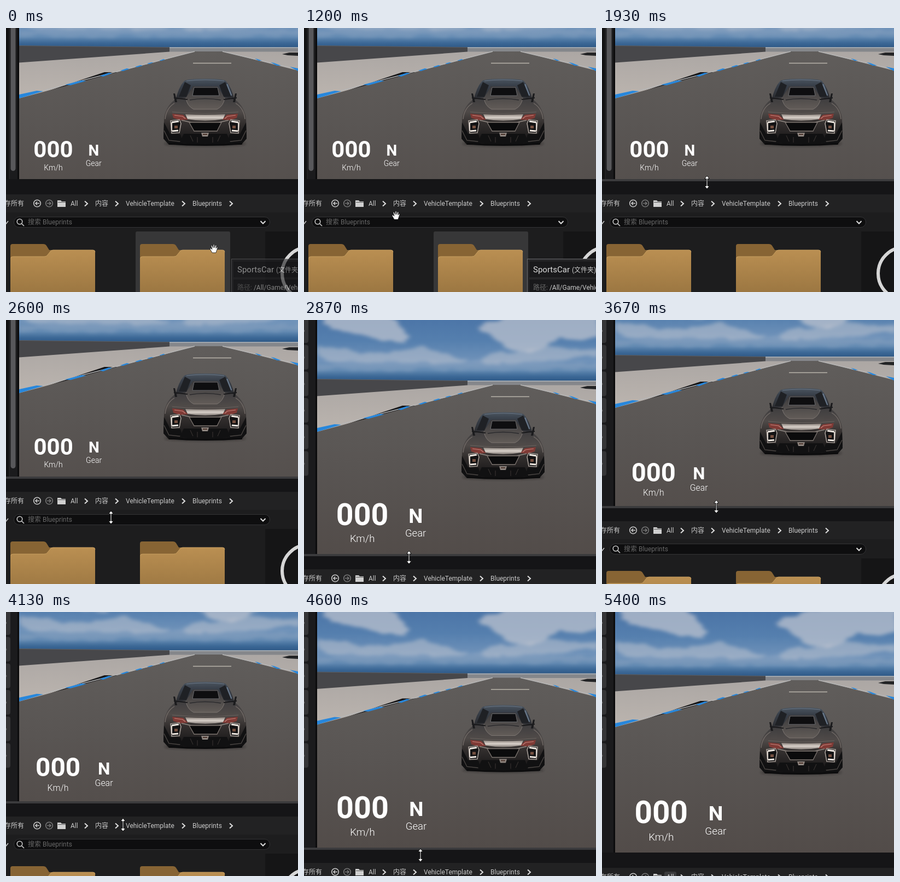
Write an HTML page that moves like this. It is 534 px wide and 484 px high and loops after 5.47 s.

```html
<!DOCTYPE html>
<html lang="zh">
<head>
<meta charset="utf-8">
<title>Editor splitter</title>
<style>
  html, body { margin: 0; width: 100%; height: 100%; overflow: hidden; background: #151517; }
  svg { display: block; width: 534px; height: 484px; }
  text { font-family: Roboto, "Noto Sans CJK SC", "Noto Sans CJK", sans-serif; font-size: 12px; fill: #c9c9c9; white-space: pre; }
  #hud text { fill: #fff; text-anchor: middle; font-weight: 300; font-size: 14px; }
  #hud .speed { font-weight: 700; font-size: 42px; }
  #hud .gear { font-weight: 700; font-size: 28px; }
  .dim { fill: #686868; }
  .line { fill: none; stroke: #c9c9c9; stroke-width: 1.6; }
  .chev { fill: none; stroke: #dedede; stroke-width: 2; }
</style>
</head>
<body>
<svg viewBox="0 0 534 484">
  <defs>
    <linearGradient id="sky" x1="0" y1="0" x2="0" y2="1">
      <stop offset="0" stop-color="#4770a4"/>
      <stop offset=".45" stop-color="#557fae"/>
      <stop offset=".72" stop-color="#6f92b9"/>
      <stop offset=".85" stop-color="#5f87b0"/>
      <stop offset=".93" stop-color="#3c6896"/>
      <stop offset="1" stop-color="#2c5684"/>
    </linearGradient>
    <linearGradient id="road" x1="0" y1="0" x2="0" y2="1">
      <stop offset="0" stop-color="#605d5b"/>
      <stop offset=".4" stop-color="#595553"/>
      <stop offset="1" stop-color="#504946"/>
    </linearGradient>
    <linearGradient id="sand" x1="0" y1="0" x2="0" y2="1">
      <stop offset="0" stop-color="#aca7a4"/>
      <stop offset="1" stop-color="#bcb5af"/>
    </linearGradient>
    <linearGradient id="body" x1="0" y1="0" x2="0" y2="1">
      <stop offset="0" stop-color="#3d3c3e"/>
      <stop offset=".3" stop-color="#4f4a48"/>
      <stop offset=".55" stop-color="#332f2e"/>
      <stop offset="1" stop-color="#141314"/>
    </linearGradient>
    <linearGradient id="roof" x1="0" y1="0" x2="0" y2="1">
      <stop offset="0" stop-color="#4b5560"/>
      <stop offset=".3" stop-color="#39404a"/>
      <stop offset="1" stop-color="#2a2a2d"/>
    </linearGradient>
    <linearGradient id="deck" x1="0" y1="0" x2="0" y2="1">
      <stop offset="0" stop-color="#3a393b"/>
      <stop offset="1" stop-color="#625c58"/>
    </linearGradient>
    <linearGradient id="chrome" x1="0" y1="0" x2="0" y2="1">
      <stop offset="0" stop-color="#8a817b"/>
      <stop offset=".5" stop-color="#d9d1ca"/>
      <stop offset="1" stop-color="#857d78"/>
    </linearGradient>
    <linearGradient id="tan" x1="0" y1="0" x2="0" y2="1">
      <stop offset="0" stop-color="#ba8f52"/>
      <stop offset="1" stop-color="#93703d"/>
    </linearGradient>
    <filter id="cloud" x="-10%" y="-20%" width="120%" height="140%">
      <feTurbulence type="fractalNoise" baseFrequency=".03 .06" numOctaves="3" seed="4"/>
      <feDisplacementMap in="SourceGraphic" scale="16" xChannelSelector="R" yChannelSelector="G"/>
      <feGaussianBlur stdDeviation="4.500 3"/>
    </filter>
    <filter id="soft" x="-20%" y="-80%" width="140%" height="260%"><feGaussianBlur stdDeviation="2"/></filter>
    <g id="folder">
      <path d="M0 120V28q0-4 4-4H60q4 0 6 3l5 8H151q4 0 4 4V120Z" transform="translate(0 -5)" fill="#876434"/>
      <path d="M0 130V46q0-4 4-4H62q4 0 6-3l4-5q2-4 6-4H151q4 0 4 4V130Z" fill="url(#tan)"/>
      <path d="M1 45q0-3 4-3H62q4 0 6-3l4-5q2-4 6-4H151q4 0 4 4" fill="none" stroke="#cda566" stroke-width=".8"/>
    </g>
    <g id="side">
      <path d="M289 252L288 282L298 293H324L319 274L300 273Z" fill="#111112"/>
      <path d="M291 246Q293 226 308 217" fill="none" stroke="#736c68" stroke-width="1.4"/>
      <path d="M304 236L324 238L333 247L318 248L306 244Z" fill="#7f3a35"/>
      <path d="M308 239L323 241L328 245" fill="none" stroke="#c4857c" stroke-width="1.2"/>
      <path d="M301 249L317 247L320 254L317 271L303 272Z" fill="#141314" stroke="#a59d97" stroke-width="1.6"/>
      <path d="M303 252L316 250M304 268L315 267" stroke="#efe8e1" stroke-width="3"/>
      <path d="M303 252V268" stroke="#d8d0c9" stroke-width="2"/>
      <rect x="308" y="258" width="6" height="5" fill="#755040"/>
      <path d="M289 267L298 285L326 288" fill="none" stroke="#4e4946" stroke-width="1.3"/>
      <path d="M321 248L338 252L345 267" fill="none" stroke="#8f8781" stroke-width="1.5"/>
      <path d="M306 199H309L313 215H309Z" fill="#1b1b1d"/>
      <path d="M327 178L316 205L330 205L338 184Z" fill="#1f2125"/>
    </g>
  </defs>

  <g id="scene">
    <rect x="24" y="-20" width="510" height="136" fill="url(#sky)"/>
    <g fill="#c2c6d0" filter="url(#cloud)">
      <g opacity=".7">
        <path d="M34 -12H150L192 30L184 42Q150 44 120 34Q70 28 34 8Z"/>
        <path d="M320 16Q350 0 400 -12H540V32Q500 44 470 34Q440 66 400 62Q360 52 345 36Z"/>
      </g>
      <g opacity=".5">
        <path d="M24 52Q70 54 105 66Q160 60 215 52L255 64Q290 70 300 78Q240 86 180 80Q90 84 24 76Z"/>
        <path d="M322 76Q350 62 400 60Q460 50 540 56V72Q440 78 322 84Z"/>
      </g>
      <path opacity=".2" d="M24 84Q280 76 540 82V94Q280 98 24 94Z"/>
    </g>
    <path d="M24 111.500L299 114.500V124L24 146Z" fill="#47474a"/>
    <path d="M24 111.500L299 114.500" stroke="#5c5e62"/>
    <path d="M299 114H534V124H299Z" fill="#85878b"/>
    <path d="M299 115H534" stroke="#a9b0b8" stroke-width="1.500"/>
    <path d="M24 142.500L299 122.500H534V160H180L24 212Z" fill="url(#sand)"/>
    <path d="M505 127L518 124H534V130L515 129Z" fill="#222325"/>
    <path d="M24 208L345 122H396L534 157V490H24Z" fill="url(#road)"/>
    <path d="M24 205L345 122M396 122L534 155" stroke="#b5b5b5" stroke-width="1.500" fill="none"/>
    <g fill="#2787dc">
      <path d="M24 201L56 194L68 195L24 208Z"/>
      <path d="M108 183L138 175L147 176L118 184Z"/>
      <path d="M171 167L188 161L194 162L178 168Z"/>
      <path d="M209 157L221 153L226 154L214 158Z"/>
      <path d="M236 150L246 147L250 148L240 151Z"/>
      <path d="M258 144L266 142L270 142L262 145Z"/>
      <path d="M280 139L288 136L291 137L284 139Z"/>
      <path d="M484 142L490 143L503 148L495 148Z"/>
      <path d="M519 150L534 153V158Z"/>
      <path d="M455 135L460 136L468 139L462 139Z"/>
    </g>
    <path d="M342 143.500H412" stroke="#b9b4aa" stroke-width="1.600"/>

    <ellipse cx="364" cy="291" rx="74" ry="4" fill="#1d1a1a" opacity=".7" filter="url(#soft)"/>
    <path d="M310 212Q315 188 326 176Q331 172 364 172Q397 172 402 176Q413 188 418 212Z" fill="url(#roof)"/>
    <path d="M404 182L412 203" stroke="#667587" stroke-width="3"/>
    <path d="M330 176Q364 172 399 176" fill="none" stroke="#697584" stroke-width="1.200"/>
    <path d="M308 211L328 206H400L420 211Q437 224 439 246L440 278L430 292H298L288 278L289 246Q291 224 308 211Z" fill="url(#body)"/>
    <path d="M329 207L342 186H387L400 207Q398 222 386 228H343Q331 222 329 207Z" fill="url(#deck)"/>
    <path d="M329 207Q331 222 343 228H386Q398 222 400 207" fill="none" stroke="#7c7571"/>
    <path d="M344 188H387L390 203H341Z" fill="#0e0e10" stroke="#6a6b6e"/>
    <path d="M336 211Q364 206 393 211" fill="none" stroke="#28282b" stroke-width="1.600"/>
    <path d="M307 207L332 210M398 210L422 207" fill="none" stroke="#19191b" stroke-width="2"/>
    <path d="M304 233Q364 238 425 233" fill="none" stroke="#6b6460" stroke-width="1.200"/>
    <use href="#side"/>
    <use href="#side" transform="translate(728 0) scale(-1 1)"/>
    <path d="M328 237Q364 239 401 237L397 246Q364 252 332 246Z" fill="url(#chrome)"/>
    <path d="M335 252H394L386 268H344Z" fill="#0b0b0c" stroke="#7d7570" stroke-width="1.300"/>
    <path d="M325 273H404L410 288L392 292H337L318 288Z" fill="#111112"/>
    <path d="M337 276L342 287M350 279V289M378 279V289M392 276L387 287" stroke="#3d3735"/>
    <path d="M357 271H371L369 278H359Z" fill="#8f8680"/>
    <path d="M360 274H368" stroke="#4b352d" stroke-width="2"/>
    <path d="M298 291Q364 296 432 291" fill="none" stroke="#0c0c0d" stroke-width="3"/>
  </g>

  <g id="hud">
    <text class="speed" x="62.500" y="-40.300">000</text>
    <text x="62.500" y="-16.500">Km/h</text>
    <text class="gear" x="136.500" y="-43.500">N</text>
    <text x="136.300" y="-24.500">Gear</text>
  </g>

  <rect width="24" height="484" fill="#1b1b1d"/>
  <path d="M22.500 0V484" stroke="#0c0c0d" stroke-width="3"/>
  <g id="tools"></g>
  <g id="bar">
    <rect width="6" height="484" fill="#121213"/>
    <path d="M6 0V484" stroke="#2c2c2e"/>
    <rect id="thumb" x="8.500" y="-10" width="9" rx="4.500" fill="#58585b"/>
  </g>

  <g id="panel">
    <rect y="277" width="534" height="500" fill="#151517"/>
    <rect id="split" y="277" width="534" height="4" fill="#3b3b3d"/>
    <rect y="305" width="534" height="400" fill="#222223"/>
    <rect y="338" width="534" height="400" fill="#1d1d1e"/>
    <rect id="hover" x="237" y="373" width="173" height="300" rx="3" fill="#373738"/>
    <rect id="crumb" x="114" y="312" width="22" height="20" rx="3" fill="#3a3a3c"/>
    <text x="-3" y="326">存所有</text>
    <circle class="line" cx="57" cy="321.500" r="6.300"/>
    <path class="line" d="M61 321.500H54M57 318.500L54 321.500L57 324.500"/>
    <g opacity=".5">
      <circle class="line" cx="79" cy="321.500" r="6.300"/>
      <path class="line" d="M75 321.500H82M79 318.500L82 321.500L79 324.500"/>
    </g>
    <path d="M94 316H100L102 318H109V328H94Z" fill="#d0d0d0"/>
    <path d="M95 319.500H109" stroke="#555"/>
    <text x="118" y="326">All</text>
    <text x="163" y="326">内容</text>
    <text x="219" y="326">VehicleTemplate</text>
    <text x="341" y="326">Blueprints</text>
    <path class="chev" d="M144 317.500L149 322L144 326.500M200 317.500L205 322L200 326.500M322 317.500L327 322L322 326.500M409 317.500L414 322L409 326.500"/>
    <path class="line" d="M-2 358L0 359L4 354"/>
    <rect x="14.500" y="346.500" width="468" height="19" rx="9.500" fill="#0e0e0f" stroke="#343436"/>
    <circle class="line" cx="25" cy="355" r="4.800"/>
    <path class="line" d="M28.500 358.500L33 363"/>
    <text class="dim" x="40" y="360">搜索 Blueprints</text>
    <path class="chev" d="M465.500 354L470 358.500L474.500 354"/>
    <use href="#folder" x="8" y="377"/>
    <use href="#folder" x="245" y="377"/>
    <rect x="474" y="373" width="60" height="300" fill="#151516"/>
    <circle cx="553" cy="450" r="48" fill="none" stroke="#d6d6d6" stroke-width="6"/>
    <g id="tip">
      <rect x=".5" y=".5" width="180" height="140" fill="#252527" stroke="#6a6a6d"/>
      <rect x="4" y="5" width="180" height="29" fill="#19191b"/>
      <rect x="4" y="38" width="180" height="90" fill="#19191b"/>
      <text x="11" y="25" style="font-size:15px;fill:#dcdcdc">SportsCar</text>
      <text x="82" y="25">(文件夹)</text>
      <text x="11" y="57"><tspan class="dim">路径: </tspan>/All/Game/Vehicle</text>
    </g>
  </g>

  <path id="hand" fill="#fff" stroke="#111" stroke-width=".8" d="M-3 8L-7 1Q-7-1-5 0L-3 2L-5-5Q-4-7-3-5L-1-1L-1-7Q0-8 1-7L1.500-1L3-6Q4-7 5-5L4 0L6-3Q7-3 7-1L5 5L4 8Z"/>
  <path id="sizer" fill="#fff" stroke="#111" stroke-width="1" d="M0-12L4.500-6.500H1V6.500H4.500L0 12L-4.500 6.500H-1V-6.500H-4.500Z"/>
</svg>
<script>
  const LOOP = 5470, STEP = 1000 / 15;
  const $ = id => document.getElementById(id);

  // [time, value]
  const split = [[0, 277], [2470, 277], [2533, 280], [2600, 287], [2667, 362], [2733, 405], [2800, 428],
    [3200, 436], [3333, 430], [3800, 305], [3933, 300], [4067, 310], [4133, 347], [4200, 390], [4333, 418],
    [4600, 432], [4667, 441]];
  const curX = [[0, 380], [1067, 380], [1200, 168], [1733, 192], [3200, 192], [3800, 214], [4133, 214],
    [4600, 213], [4933, 213], [5330, 125]];
  const curY = [[0, 404], [1067, 404], [1200, 343], [1733, 283], [2467, 283], [2533, 292], [2600, 362],
    [2667, 410], [2733, 433], [3200, 441], [3333, 428], [3800, 308], [4000, 305], [4067, 351], [4133, 390],
    [4200, 420], [4333, 434], [4600, 446], [4933, 446], [5330, 505]];

  function at(keys, t) {
    const i = keys.findIndex(k => k[0] > t);
    if (i < 0) return keys[keys.length - 1][1];
    const [t0, a] = keys[i - 1], [t1, b] = keys[i];
    return a + (b - a) * (t - t0) / (t1 - t0);
  }
  const move = (id, x, y, more = "") => $(id).setAttribute("transform", `translate(${x} ${y})${more}`);
  const show = (id, on) => $(id).style.display = on ? "" : "none";

  $("tools").innerHTML = Array.from({ length: 6 }, (_, i) => {
    const y = -3 + i * 48.7;
    return `<rect x="-20" y="${y}" width="28" height="45" rx="4" fill="#353537"/>
      <path d="M-1 ${y + 20}L1 ${y + 23}L-1 ${y + 26}" fill="none" stroke="#777"/>`;
  }).join("");

  function draw(now) {
    const t = Math.floor((now % LOOP + 5) / STEP) * STEP;
    const s = Math.round(at(split, t)), x = at(curX, t), y = at(curY, t);
    const zoom = Math.max(1, 1 + (s - 286) * .00225);
    move("scene", 0, (s - 435) / 2);
    move("hud", 24, s, ` scale(${zoom})`);
    move("panel", 0, s - 277);
    move("tip", t < STEP ? 412 : 408, 423);
    $("tip").style.opacity = t < STEP ? .6 : 1;
    show("tip", t < 1260);
    show("hover", t < 1260);
    show("crumb", t > 5300);

    const scroll = s < 303;
    show("bar", scroll);
    show("tools", !scroll);
    $("thumb").setAttribute("height", Math.max(0, s - 5));

    const sizing = t > 1650 && t < 4990;
    show("split", sizing);
    show("sizer", sizing);
    show("hand", !sizing);
    move("hand", x, y);
    move("sizer", x, y);
  }

  const start = performance.now();
  function tick() {
    draw(performance.now() - start);
    requestAnimationFrame(tick);
  }
  tick();
</script>
</body>
</html>
```
